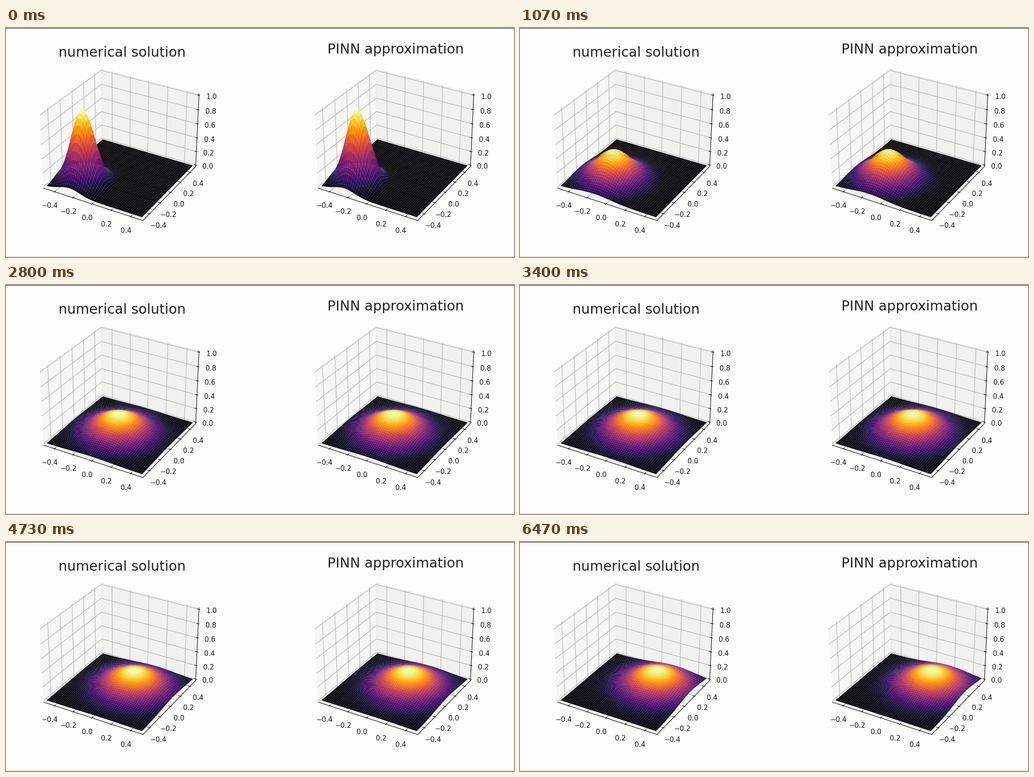
A matplotlib script for the animation above (6.54 s loop, 1113x503 px).

```python
import numpy as np
import matplotlib.pyplot as plt
from matplotlib.animation import FuncAnimation
from matplotlib.collections import LineCollection, PolyCollection

W, H, DPI = 1113, 503, 100
FRAMES, LOOP_MS = 98, 6540
PX = 72 / DPI                      # points per pixel
CENTER, SCALE, PANEL_SHIFT = (252.1, 248.4), 2094, 602
CELLS = 50
LO, HI = -0.5 - 1 / 48, 0.5 + 1 / 48      # padded x and y range
ZLO, ZHI = -1 / 48, 1 + 1 / 48
LABEL_GAP = 0.086
TICK_OUT, TICK_IN = 0.1 / 12, 0.2 / 12
XY_TICKS = np.array([-0.4, -0.2, 0.0, 0.2, 0.4])
Z_TICKS = np.linspace(0, 1, 6)

# Camera basis for elevation 30 and azimuth -60 degrees.
ELEV, AZIM = np.radians(30), np.radians(-60)
EYE = np.array([np.cos(ELEV) * np.cos(AZIM), np.cos(ELEV) * np.sin(AZIM), np.sin(ELEV)])
RIGHT = np.array([-np.sin(AZIM), np.cos(AZIM), 0])
UP = np.cross(EYE, RIGHT)
BOX = np.array([8 / 7, 8 / 7, 6 / 7])
DISTANCE = 10


def project(points):
    """Map data points (..., 3) to stage pixels of the left panel."""
    p = (np.asarray(points, float) - [0, 0, 0.5]) * BOX
    depth = DISTANCE - p @ EYE
    return np.stack([CENTER[0] + SCALE * (p @ RIGHT) / depth,
                     CENTER[1] - SCALE * (p @ UP) / depth], axis=-1)


fig = plt.figure(figsize=(W / DPI, H / DPI), dpi=DPI, facecolor="#fdfdfc")
ax = fig.add_axes([0, 0, 1, 1])
ax.set_xlim(0, W)
ax.set_ylim(H, 0)
ax.axis("off")


def draw_lines(paths, shift, color, width, zorder):
    segments = [project(path) + [shift, 0] for path in paths]
    ax.add_collection(LineCollection(segments, colors=color, linewidths=width * PX,
                                     capstyle="projecting", zorder=zorder))


def draw_label(point, value, shift):
    x, y = project(point)
    text = f"{value:.1f}".replace("-", "\u2212")
    ax.text(x + shift, y, text, fontsize=15 * PX, family="DejaVu Sans",
            color="#111111", ha="center", va="top", zorder=4)


def draw_box(shift):
    panes = [
        ([(LO, LO, ZLO), (LO, HI, ZLO), (LO, HI, ZHI), (LO, LO, ZHI)], 0.95),
        ([(LO, HI, ZLO), (HI, HI, ZLO), (HI, HI, ZHI), (LO, HI, ZHI)], 0.90),
        ([(LO, LO, ZLO), (HI, LO, ZLO), (HI, HI, ZLO), (LO, HI, ZLO)], 0.925),
    ]
    for corners, gray in panes:
        color = (gray, gray, gray, 0.5)
        ax.add_collection(PolyCollection([project(corners) + [shift, 0]], facecolors=color,
                                         edgecolors=color, linewidths=1.4 * PX, zorder=1))

    grid = [[(t, LO, ZLO), (t, HI, ZLO), (t, HI, ZHI)] for t in XY_TICKS]
    grid += [[(HI, t, ZLO), (LO, t, ZLO), (LO, t, ZHI)] for t in XY_TICKS]
    grid += [[(LO, LO, t), (LO, HI, t), (HI, HI, t)] for t in Z_TICKS]
    draw_lines(grid, shift, "#b0b0b4", 1.2, 2)

    axes = [[(LO, LO, ZLO), (HI, LO, ZLO)],
            [(HI, LO, ZLO), (HI, HI, ZLO)],
            [(HI, HI, ZLO), (HI, HI, ZHI)]]
    ticks = [[(t, LO - TICK_OUT, ZLO), (t, LO + TICK_IN, ZLO)] for t in XY_TICKS]
    ticks += [[(HI + TICK_OUT, t, ZLO), (HI - TICK_IN, t, ZLO)] for t in XY_TICKS]
    ticks += [[(HI + TICK_OUT, HI, t), (HI - TICK_IN, HI, t)] for t in Z_TICKS]
    draw_lines(axes + ticks, shift, "#111111", 1.2, 3)

    for t in XY_TICKS:
        draw_label((t, LO - LABEL_GAP, ZLO - LABEL_GAP), t, shift)
        draw_label((HI + LABEL_GAP, t, ZLO - LABEL_GAP), t, shift)
    for t in Z_TICKS:
        draw_label((HI + LABEL_GAP, HI + LABEL_GAP, t), t, shift)


def draw_title(x, baseline, text):
    ax.text(x, baseline, text, fontsize=30 * PX, family="DejaVu Sans",
            color="#222222", ha="center", va="baseline", zorder=4)


for panel_shift in (0, PANEL_SHIFT):
    draw_box(panel_shift)
draw_title(254, 62.5, "numerical solution")
draw_title(853.5, 56, "PINN approximation")
ax.fill_between([0, W], 0, 1, color="#101010", linewidth=0)
ax.fill_between([0, W], H - 1, H, color="#c4c4c4", linewidth=0)

# Rows run from the far side to the near side, so cells paint back to front.
xs = np.linspace(-0.5, 0.5, CELLS + 1)
ys = xs[::-1]
X, Y = np.meshgrid(xs, ys)
surface = PolyCollection([], edgecolors="none", linewidths=0, antialiased=True, zorder=5)
ax.add_collection(surface)
inferno = plt.get_cmap("inferno")

START, GOAL, DRIFT_RATE = -0.253, 0.293, 0.21
VAR_START, VAR_GAIN, SPREAD_RATE = 0.012, 0.0374, 0.6


def height(t):
    """A drifting, spreading bell that keeps its volume."""
    center = GOAL + (START - GOAL) * np.exp(-DRIFT_RATE * t)
    var = VAR_START + VAR_GAIN * (1 - np.exp(-SPREAD_RATE * t))
    distance_sq = (X - center) ** 2 + (Y - center) ** 2
    return VAR_START / var * np.exp(-distance_sq / (2 * var))


def cell_corners(a):
    return np.stack([a[:-1, :-1], a[:-1, 1:], a[1:, 1:], a[1:, :-1]], axis=2)


def update(frame):
    z = height(frame * LOOP_MS / FRAMES / 1000)
    quads = cell_corners(project(np.stack([X, Y, z], axis=-1))).reshape(-1, 4, 2)
    level = cell_corners(z).mean(axis=2).ravel()
    colors = inferno((level - level.min()) / np.ptp(level))
    surface.set_verts(np.concatenate([quads, quads + [PANEL_SHIFT, 0]]))
    surface.set_facecolor(np.concatenate([colors, colors]))
    return (surface,)


anim = FuncAnimation(fig, update, frames=FRAMES, interval=LOOP_MS / FRAMES,
                     repeat=True, repeat_delay=0, blit=False)
plt.show()
```
